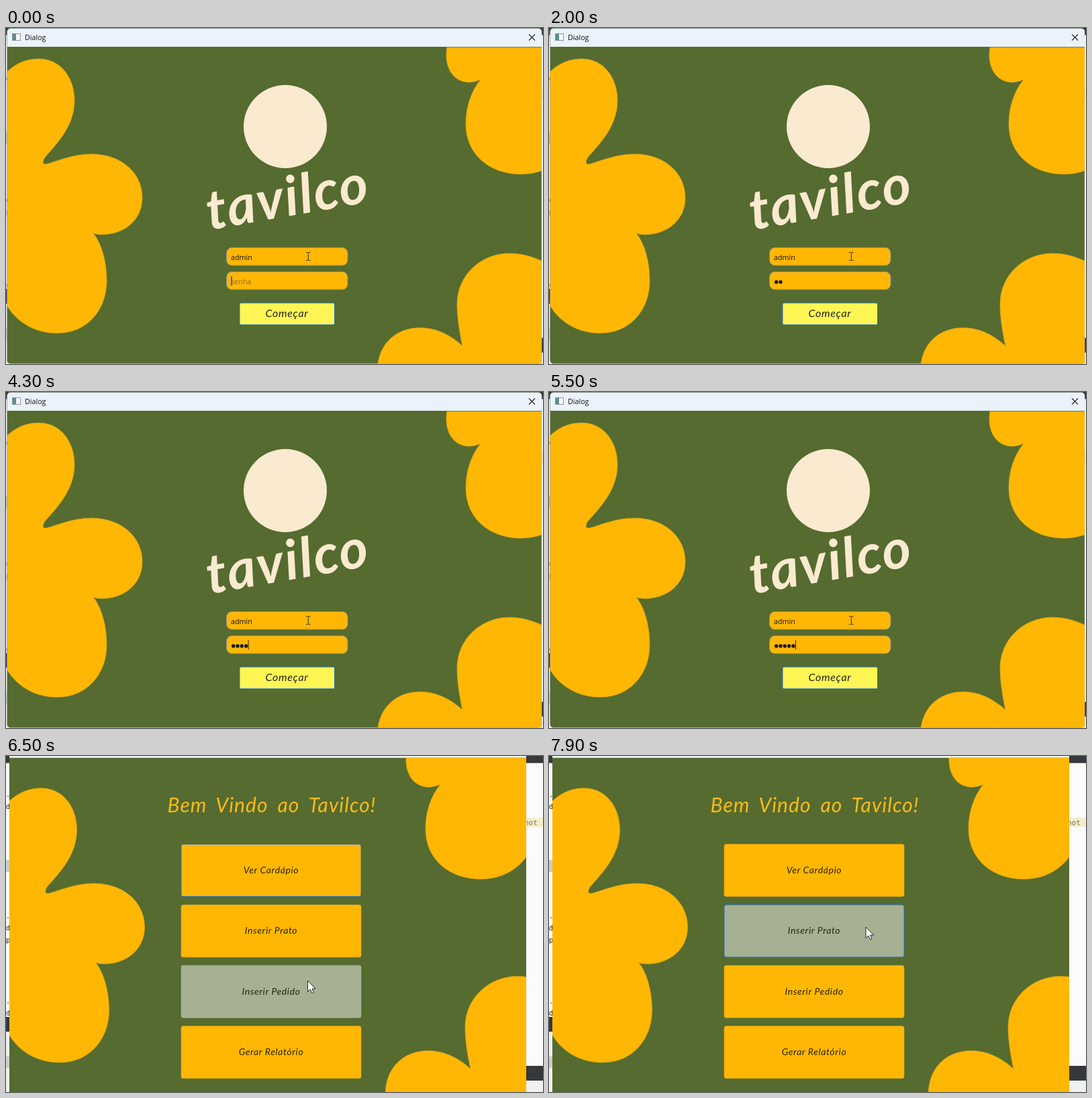
An HTML page that plays this animation: 800x501 px, repeating every 8000 ms.

```html
<!DOCTYPE html>
<html lang="pt">
<head>
<meta charset="utf-8">
<title>Dialog</title>
<style>
  html, body { margin: 0; width: 100%; height: 100%; overflow: hidden; background: #fff; }
  svg { display: block; width: 800px; height: 501px; }
  .ui { font: 10.7px "Open Sans", "Noto Sans", sans-serif; fill: #111; }
  .mono { font: 10px "DejaVu Sans Mono", monospace; fill: #222; }
  .hand { font-family: Lato, sans-serif; font-style: italic; text-anchor: middle; }
  .label { font-size: 14px; letter-spacing: .6px; fill: #2b2408; }
  .flower { fill: #ffb703; stroke: #d5a51a; stroke-width: .8; }
</style>
</head>
<body>
<svg viewBox="0 0 800 501">
  <defs>
    <g id="flowers">
      <path class="flower" d="M-9 76 C10 54 28 46 49 46 C82 46 102 75 102 108 C102 148 73 175 57 194 Q52 204 60 203 C78 198 100 188 127 188 C172 188 203 216 203 253 C203 288 174 308 143 308 Q135 308 130 306 C143 322 150 350 150 377 C150 421 120 455 77 455 C42 455 12 438 -4 404Z"/>
      <path class="flower" d="M657 0 V28 C652 57 665 81 691 81 Q700 80 707 77 C693 94 685 118 685 143 C685 190 722 218 767 218 C797 218 823 205 840 178 V0Z"/>
      <path class="flower" d="M553 514 C553 470 582 447 617 447 C645 447 667 462 680 474 C676 455 672 432 672 412 C672 368 708 336 750 336 C775 336 790 344 812 353 V580 H553Z"/>
    </g>
    <clipPath id="dialogArea"><rect x="2" y="28.7" width="796" height="471.5"/></clipPath>
    <clipPath id="menuArea"><rect x="5" y="2.5" width="770" height="600"/></clipPath>
  </defs>

  <!-- editor behind the windows -->
  <rect width="800" height="501" fill="#fbfbfc"/>
  <rect width="800" height="10.5" fill="#37383c"/>
  <rect y="155" width="12" height="18" fill="#c6cfcb"/>
  <rect y="411" width="800" height="90" fill="#f0f0f1"/>
  <rect y="389" width="400" height="22" fill="#37383c"/>
  <rect y="448" width="12" height="17" fill="#c6cfcb"/>
  <rect x="400" y="411" width="400" height="51" fill="#fbfbfc"/>
  <rect x="400" y="462" width="400" height="22" fill="#37383c"/>
  <rect x="760" y="92" width="40" height="14" fill="#f4edcd"/>
  <g id="code" class="mono"></g>
  <text class="mono" x="772" y="103" style="font-size:11px;fill:#77714d">not</text>

  <g id="dialog">
    <rect x="1.5" y=".5" width="796.5" height="500" rx="5" fill="#556b2f" stroke="#a9b0a8" stroke-width=".6"/>
    <path d="M2 28V6Q2 1 7 1H793Q798 1 798 6V28Z" fill="#ebf2fb"/>
    <use href="#flowers" clip-path="url(#dialogArea)"/>
    <rect x="9.5" y="8.5" width="12" height="10" fill="#f8f8f8" stroke="#8b9398"/>
    <rect x="10" y="9" width="5" height="9" fill="#5f8f8c"/>
    <text class="ui" x="28" y="18">Dialog</text>
    <path d="M779 9.5l9 9m0-9l-9 9" stroke="#222" stroke-width="1.1"/>
    <circle cx="416" cy="147" r="62" fill="#f9ead0"/>
    <text class="hand" transform="translate(424 280) rotate(-10)" font-size="82" font-weight="700" letter-spacing="2" fill="#f9ead0">tavilco</text>
    <g fill="#ffb703" stroke="#8a8f92">
      <rect x="328.5" y="327.5" width="180.5" height="26.5" rx="8"/>
      <rect x="328.5" y="363.5" width="180.5" height="26.5" rx="8"/>
    </g>
    <text class="ui" x="335" y="345.5">admin</text>
    <text class="ui" id="hint" x="335" y="381.5" style="fill:#8f6b1c">senha</text>
    <g id="dots" fill="#1b1b1b"></g>
    <rect id="caret" y="370" height="14"/>
    <rect x="348" y="410" width="141.5" height="32.5" rx="2" fill="#fff655" stroke="#2f74b5"/>
    <text class="hand" x="418.5" y="431" font-size="16" letter-spacing=".7" fill="#222">Começar</text>
    <path d="M447 334.5h2.5l.8 1l.8-1h2.5M450.3 335v11M447 346.5h2.5l.8-1l.8 1h2.5" fill="none" stroke="#3a3424"/>
  </g>

  <g id="menu">
    <rect x="5" y="-26" width="770" height="30" fill="#eef6f6"/>
    <g id="menuFlowers" clip-path="url(#menuArea)">
      <rect x="5" y="2.5" width="770" height="600" fill="#556b2f"/>
    </g>
    <text class="hand" x="396" y="84" font-size="30" letter-spacing="1" word-spacing="6" fill="#fcbb18">Bem Vindo ao Tavilco!</text>
    <g id="buttons"></g>
  </g>
  <path id="arrow" d="M0 0V16.5L3.8 13L6.4 18.7L9 17.5L6.5 12H11.5Z" fill="#fff" stroke="#222"/>
</svg>
<script>
const $ = id => document.getElementById(id);
const make = (parent, tag, attrs, text = '') => {
  const el = document.createElementNS('http://www.w3.org/2000/svg', tag);
  for (const k in attrs) el.setAttribute(k, attrs[k]);
  el.textContent = text;
  return parent.appendChild(el);
};
const show = (el, on) => el.style.display = on ? '' : 'none';
const clamp = x => Math.max(0, Math.min(1, x));

[[61, '.h'], [79, 'di'], [242, '.c'], [260, 'di'], [278, 'p'], [369, '.u'], [387, 'di']]
  .forEach(([y, s]) => make($('code'), 'text', { x: 0, y }, s));

// The menu window crops the same three flowers with its own offsets.
[[3.5, 2], [-60, -34.5], [12, -7.5]].forEach(([x, y], i) => {
  const copy = $('flowers').children[i].cloneNode();
  copy.setAttribute('transform', `translate(${x} ${y})`);
  $('menuFlowers').appendChild(copy);
});

const dots = Array.from({ length: 5 }, (_, i) =>
  make($('dots'), 'circle', { cx: 338.7 + 6.3 * i, cy: 378.7, r: 2.7 }));

const top0 = 131.5, pitch = 90.4, height = 78;
const buttons = ['Ver Cardápio', 'Inserir Prato', 'Inserir Pedido', 'Gerar Relatório'].map((s, i) => {
  const y = top0 + pitch * i;
  const box = make($('buttons'), 'rect', { x: 261, y, width: 268, height, rx: 3 });
  make($('buttons'), 'text', { x: 395, y: y + 43.5, class: 'hand label' }, s);
  return box;
});

const keys = [700, 1000, 3000, 4000, 5200];
const opening = 5580;

function drawDialog(t) {
  const typed = keys.filter(k => k <= t).length;
  const last = typed ? keys[typed - 1] : 0;
  show($('hint'), !typed);
  dots.forEach((d, i) => show(d, i < typed));
  const caret = $('caret');
  show(caret, (t - last) % 1060 < 530);
  caret.setAttribute('x', 335 + 6.4 * typed);
  caret.setAttribute('width', typed < 3 ? 2 : 1);
  caret.setAttribute('fill', typed < 3 ? '#2f6fc0' : '#222');
}

function drawMenu(t) {
  const p = clamp((t - opening) / 250);
  const gap = .06 * (1 - p) ** 3;
  $('menu').setAttribute('transform', `translate(${360 * gap} ${244 * gap}) scale(${1 - gap})`);
  $('menu').setAttribute('opacity', clamp(p * 2.1));

  const lift = clamp((t - 5700) / 400);
  const m = clamp((t - 6900) / 600);
  const move = m * m * (3 - 2 * m);
  const x = 448.5 + lift + 22.5 * move;
  const y = 339 - 4 * lift - 80 * move;
  $('arrow').setAttribute('transform', `translate(${x} ${y})`);

  const focus = t < 7700 ? 0 : 1;
  buttons.forEach((b, i) => {
    const dy = y - top0 - pitch * i;
    const hover = dy >= 0 && dy < height;
    b.setAttribute('fill', hover ? '#a6b193' : '#ffb703');
    b.setAttribute('stroke', i === focus ? (t < 5800 ? '#8c9a86' : '#2a73bd') : hover ? '#b1ba9f' : '#e3a91a');
    b.setAttribute('stroke-width', i === focus ? 1 : .6);
  });
}

function frame(now) {
  const t = Math.floor(now / 100) * 100 % 8000;
  const inMenu = t >= opening;
  show($('dialog'), !inMenu);
  show($('menu'), inMenu);
  show($('arrow'), inMenu);
  (inMenu ? drawMenu : drawDialog)(t);
  requestAnimationFrame(frame);
}
frame(0);
</script>
</body>
</html>
```
